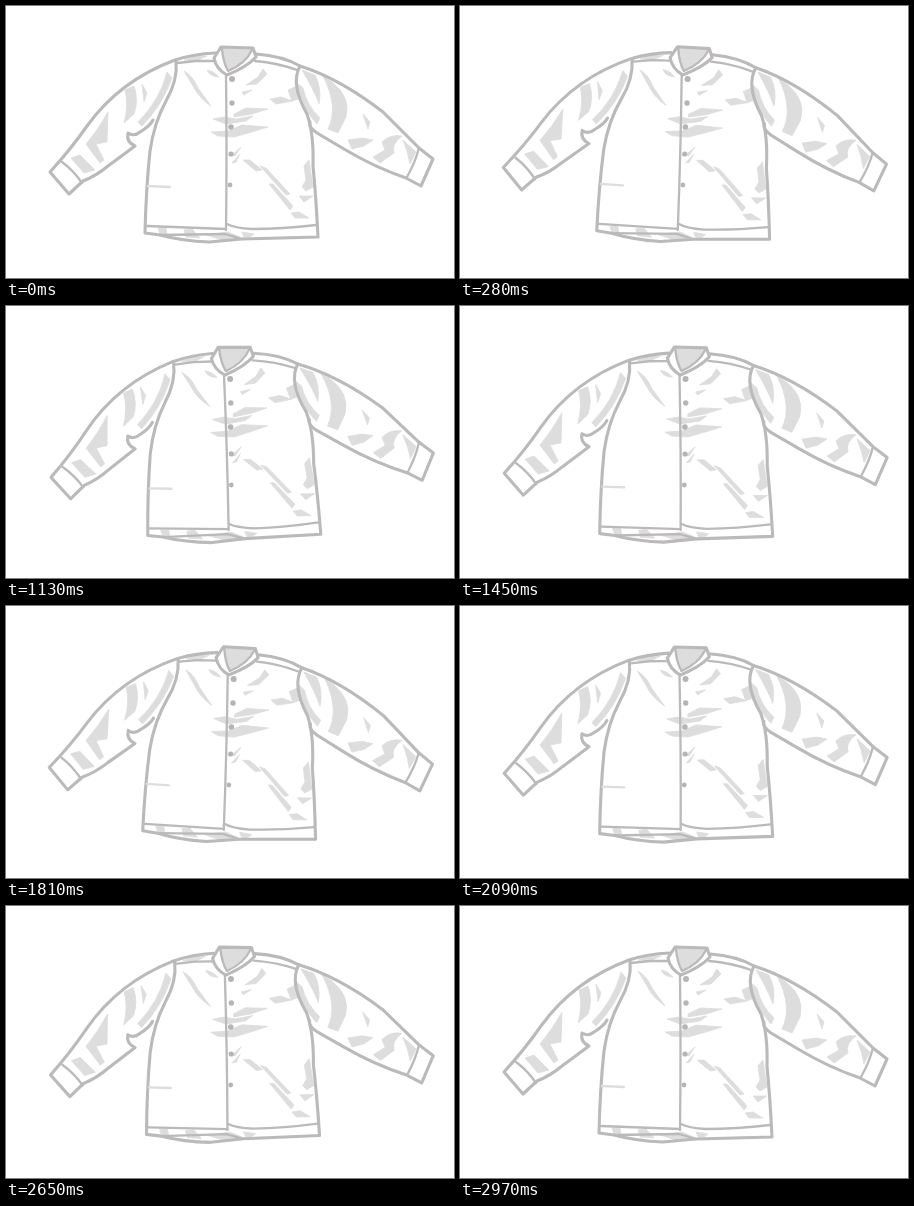
These frames come from a looping animation (448 by 272 pixels, 3.01 s). An HTML page:

```html
<!DOCTYPE html>
<html lang="en">
<head>
<meta charset="utf-8">
<title>Swaying shirt</title>
<style>
  html, body { margin: 0; width: 100%; height: 100%; overflow: hidden; background: #fff; }
  svg { display: block; width: 448px; height: 272px; }
  .shade { fill: #dedddd; stroke: #dedddd; stroke-width: .8; stroke-linejoin: round; }
  .line { fill: none; stroke: #bbb9b9; stroke-width: 2.3; stroke-linecap: round; stroke-linejoin: round; }
  .edge { stroke-width: 3.1; }
  .crease { stroke: #dedddd; }
  .buttons { fill: #b6b4b4; }
</style>
</head>
<body>
<svg viewBox="0 0 448 272">
  <g id="shirt">
    <!-- neck opening, hem lining and folds -->
    <g class="shade">
      <path d="M216 42L247 43Q240 54 222 64Q217 54 216 42Z"/>
      <path d="M152 222L160 222L161 228L154 228ZM178 224L186 223L194 232L180 231ZM200 229L222 226L234 231L216 234ZM236 226L248 228L244 231L238 231Z"/>
      <path d="M178 54L190 50L201 50L190 55ZM201 64Q208 65 213 71Q204 71 201 64Z"/>
      <path d="M178 65Q187 70 192 82L205 100Q192 91 187 80Z"/>
      <path d="M119 84L128 80Q133 94 128 108L118 117Q123 99 119 84ZM136 78L141 87L138 96ZM161 66L166 72Q156 100 136 120L132 116Q154 94 161 66Z"/>
      <path d="M102 106L101 136L90 138L98 154L94 157L80 138Q92 124 102 106ZM65 152L74 149L89 164L78 167Z"/>
      <path d="M228 108L240 102L262 103L246 108L228 111ZM240 79L252 71L257 63L261 68L251 78ZM236 86L246 84L238 89ZM264 93L275 91L287 95L270 98ZM282 84L291 80L295 92L286 95Z"/>
      <path d="M207 113L218 111L230 113L247 110L240 115L220 118ZM205 126L222 125L236 119L262 121L246 126L228 131L212 130Z"/>
      <path d="M226 149L235 141L229 150ZM226 157L234 148L230 156ZM237 154L244 154L256 164L250 165Z"/>
      <path d="M254 160L260 162L284 188L280 189ZM263 178L267 178L287 200L284 204Z"/>
      <path d="M298 160L303 154L307 181L300 185L296 181L300 174ZM293 190L307 190L298 196ZM285 207L293 206L303 212L289 212Z"/>
      <path d="M291 77L297 82Q301 100 314 112L311 118Q297 104 291 77ZM296 64L309 69Q316 82 313 98Q308 84 296 64Z"/>
      <path d="M317 70L326 76Q345 91 340 111L332 127L322 123Q333 101 317 70Z"/>
      <path d="M342 134L356 132L367 134L358 140L346 143ZM357 108L364 116L362 123ZM367 151L379 144L376 136Q384 128 396 130Q385 138 388 147L374 157ZM397 134L410 146L404 158Q402 146 397 134Z"/>
    </g>
    <!-- sleeves, cuffs and body -->
    <g class="line edge">
      <path d="M209 47Q188 48 169 54C126 70 99 95 81 120Q65 143 44 166L63 188L77 175Q90 170 102 160L129 140Q120 136 122 127Q128 131 134 126Q144 120 147 114"/>
      <path d="M250 48Q277 50 294 60C326 70 355 89 377 106Q398 127 413 142L427 153L415 180L400 172Q368 161 338 143L311 127Q302 121 304 116"/>
      <path d="M170 55Q172 74 160 95Q148 117 144 145Q140 183 139 227L154 229Q176 235 203 236L236 233L312 231Q310 190 307 160Q308 128 301 108Q284 78 294 60"/>
      <path d="M215 41L247 42L250 51Q241 61 221 69Q210 63 208 52Z"/>
    </g>
    <g class="line">
      <path d="M56 156Q68 165 76 177M413 142Q409 157 401 171"/>
      <path d="M171 57L190 55L208 55M249 55Q272 57 291 64"/>
      <path d="M216 43Q217 56 222 65Q240 57 246 44M220 69Q221 145 220 224"/>
      <path d="M141 220L220 223M221 218Q228 222 246 223Q276 223 310 219M154 229L219 228L236 233"/>
      <path class="crease" d="M142 180L164 181"/>
    </g>
    <g class="buttons">
      <circle cx="226" cy="73" r="3"/>
      <circle cx="226" cy="97" r="2.7"/>
      <circle cx="225" cy="121" r="2.8"/>
      <circle cx="225" cy="148" r="2.6"/>
      <circle cx="224" cy="179" r="2.4"/>
    </g>
  </g>
</svg>
<script>
  const LOOP = 3010, STEP = 40, HOLD = 320, RESUME = 610;
  const shirt = document.getElementById("shirt");
  // [time in ms, tilt in degrees]
  const keys = [[0, 0], [HOLD, 1.5], [RESUME, 1.5], [1190, -1.8], [1770, 1.5], [2350, -1.8], [2970, 0], [LOOP, 0]];

  const stepped = t => t < RESUME
    ? Math.min(HOLD, Math.floor(t / STEP) * STEP)
    : RESUME + Math.floor((t - RESUME) / STEP) * STEP;

  function tilt(t) {
    const i = keys.findIndex(k => k[0] > t);
    const [t0, a] = keys[i - 1], [t1, b] = keys[i];
    return a + (b - a) * (1 - Math.cos(Math.PI * (t - t0) / (t1 - t0))) / 2;
  }

  function draw() {
    const t = stepped(performance.now() % LOOP);
    shirt.setAttribute("transform", `rotate(${tilt(t)} 224 136)`);
    requestAnimationFrame(draw);
  }
  draw();
</script>
</body>
</html>
```
